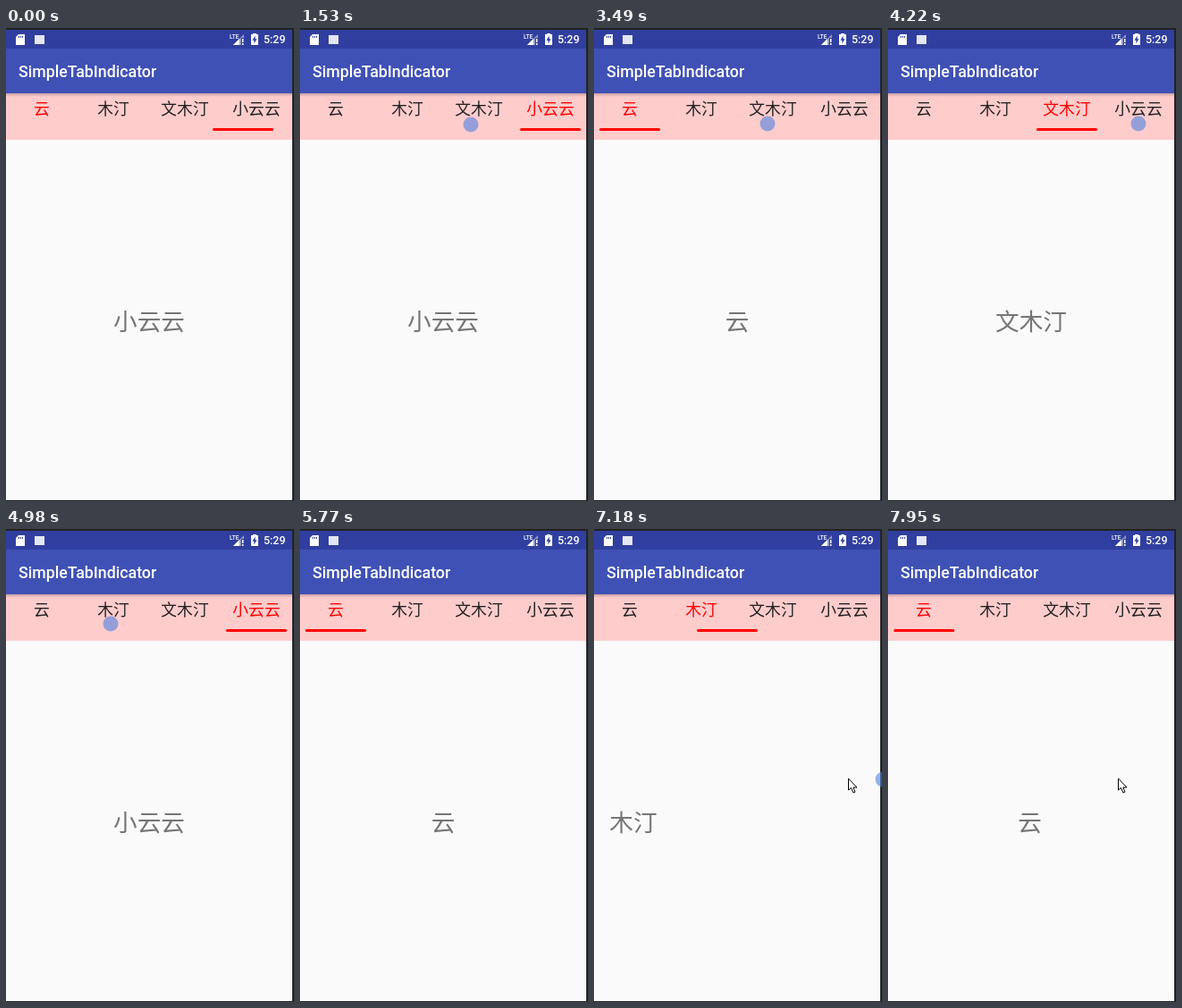
An HTML page with a canvas that plays this animation: 322x529 px, repeating every 7990 ms.

```html
<!DOCTYPE html>
<html lang="zh-CN">
<head>
<meta charset="utf-8">
<title>SimpleTabIndicator</title>
<style>
html, body { margin: 0; width: 322px; height: 529px; overflow: hidden; background: #222; }
canvas { display: block; }
</style>
</head>
<body>
<canvas id="stage" width="322" height="529"></canvas>
<script>
const ctx = document.getElementById('stage').getContext('2d');
const LOOP = 7990, SCREEN = 320, TAB = 80;
const LABELS = ['云', '木汀', '文木汀', '小云云'];
const CJK = '"Noto Sans CJK SC", "Noto Sans CJK", sans-serif';

// The screen refreshes in bursts: [first, last, refreshes]
const BURSTS = [
  [40, 160, 4], [590, 890, 7], [1530, 1890, 8], [2060, 2360, 8], [2640, 2940, 8],
  [3490, 3760, 7], [4120, 4450, 7], [4980, 4980, 1], [5090, 5770, 13], [6030, 6350, 7],
  [6410, 6500, 3], [6590, 6790, 5], [6830, 7180, 9], [7230, 7580, 8], [7630, 7950, 8]
];

const tap = (down, up, from, to, x, y = 107) => ({ down, up, from, to, x, y, drag: 0, dur: 200 });
const swipe = (down, up, from, x, drag, dur) =>
  ({ down, up, from, to: from - 1, x, y: 280, drag, dur, slide: true });

const MOVES = [
  tap(-200, -2.56, 3, 0, 40),
  tap(590, 727, 0, 3, 280),
  tap(1530, 1727, 3, 2, 191, 108),
  tap(2060, 2197, 2, 1, 118),
  tap(2640, 2777, 1, 0, 40),
  tap(3490, 3597, 0, 2, 194),
  tap(4120, 4287, 2, 3, 280),
  tap(4980, 5140, 3, 1, 117, 106),
  tap(5430, 5600, 1, 0, 40),
  tap(6030, 6187, 0, 2, 197),
  { ...tap(6410, 6478.3, 2, 3, 278), dur: 300, slide: true },
  swipe(6830, 6950, 3, 110, 160, 180),
  swipe(7070, 7180, 2, 119, 204, 380),
  swipe(7630, 7740, 1, 90, 168, 342)
];

const ARROW_PATH = [[6830, 110], [6950, 250], [7070, 118], [7180, 284], [7580, 95], [7630, 90], [7740, 257], [LOOP, 257]];

const settle = u => 1 - (1 - Math.min(1, u)) ** 5;

function snap(t) {
  const burst = BURSTS.findLast(b => b[0] <= t);
  if (!burst) return 0;
  const [first, last, count] = burst;
  if (t >= last) return last;
  const step = (last - first) / (count - 1);
  return first + Math.floor((t - first) / step) * step;
}

function stateAt(t) {
  const m = MOVES.findLast(m => m.down <= t);
  const held = Math.min(1, (t - m.down) / (m.up - m.down));
  let pos = m.from - m.drag * held / SCREEN;
  if (t >= m.up) pos += (m.to - pos) * settle((t - m.up) / m.dur);
  return {
    pos,
    selected: t < m.up ? m.from : m.to,
    page: m.slide ? pos : t < m.up + 30 ? m.from : m.to,
    touch: t <= m.up ? { x: m.x + m.drag * held, y: m.y } : null
  };
}

function rect(color, x, y, w, h) {
  ctx.fillStyle = color;
  ctx.fillRect(x, y, w, h);
}

function shape(color, ...points) {
  ctx.fillStyle = color;
  ctx.beginPath();
  points.forEach(([x, y]) => ctx.lineTo(x, y));
  ctx.closePath();
  ctx.fill();
}

function text(str, x, y, font, color, align = 'left') {
  ctx.font = font;
  ctx.fillStyle = color;
  ctx.textAlign = align;
  ctx.fillText(str, x, y);
}

function drawStatusBar() {
  rect('#303f9f', 0, 2, SCREEN, 21);
  shape('#fff', [14, 7], [21, 7], [21, 19], [11, 19], [11, 10]);
  for (const x of [14, 16, 18]) rect('#303f9f', x, 9, 1, 2);
  rect('#e4e6f3', 32, 8, 11, 10);
  text('LTE', 250, 12, '500 6.5px Roboto, sans-serif', '#fff');
  shape('#8f97cb', [254, 19], [266, 7], [266, 19]);
  shape('#fff', [254, 19], [261, 12], [261, 19]);
  rect('#303f9f', 263, 11, 3, 8);
  rect('#fff', 264, 12, 1.5, 4);
  rect('#fff', 264, 17, 1.5, 2);
  rect('#fff', 276, 6, 4, 2);
  rect('#fff', 274, 7, 8, 12);
  shape('#303f9f', [278.6, 8.5], [275.5, 13.8], [277.4, 13.8], [277.4, 17.5], [280.5, 12.2], [278.6, 12.2]);
  text('5:29', 288, 17.4, '500 12.45px Roboto, sans-serif', '#fff');
}

function drawAppBar() {
  rect('#3f51b5', 0, 23, SCREEN, 50);
  text('SimpleTabIndicator', 14, 55, '500 17.78px Roboto, sans-serif', '#fff');
}

function drawTabs({ pos, selected }) {
  rect('#ffcccc', 0, 73, SCREEN, 52);
  const shade = ctx.createLinearGradient(0, 73, 0, 77);
  shade.addColorStop(0, 'rgba(0,0,0,.22)');
  shade.addColorStop(1, 'rgba(0,0,0,0)');
  rect(shade, 0, 73, SCREEN, 4);
  LABELS.forEach((label, i) =>
    text(label, TAB * (i + .5), 96.8, '17.78px ' + CJK, i === selected ? '#f00' : '#212121', 'center'));
  ctx.fillStyle = '#f00';
  ctx.beginPath();
  ctx.roundRect(6 + TAB * pos, 112, 68, 3, 1.5);
  ctx.fill();
}

function drawPages(page) {
  LABELS.forEach((label, i) => {
    const x = SCREEN * (i - page + .5);
    if (x > -50 && x < SCREEN + 50) text(label, x, 337.7, '26.67px ' + CJK, '#757575', 'center');
  });
}

function drawTouch({ x, y }) {
  ctx.fillStyle = 'rgba(70,125,225,.58)';
  ctx.beginPath();
  ctx.arc(x, y, 8.5, 0, Math.PI * 2);
  ctx.fill();
}

function drawArrow(t) {
  const next = ARROW_PATH.findIndex(p => p[0] > t);
  if (next < 1) return;
  const [[t0, x0], [t1, x1]] = ARROW_PATH.slice(next - 1, next + 1);
  const x = Math.round(x0 + (x1 - x0) * (t - t0) / (t1 - t0));
  ctx.save();
  ctx.translate(x + .5, 279);
  shape('#fff', [0, 0], [0, 13], [3, 10.5], [5.5, 16], [7.5, 15], [5.3, 10], [9.5, 10]);
  ctx.strokeStyle = '#000';
  ctx.lineWidth = 1;
  ctx.stroke();
  ctx.restore();
}

function draw(time) {
  const t = snap(time);
  const state = stateAt(t);
  rect('#222', 0, 0, 322, 529);
  ctx.save();
  ctx.beginPath();
  ctx.rect(0, 0, SCREEN, 528);
  ctx.clip();
  rect('#fafafa', 0, 125, SCREEN, 403);
  drawStatusBar();
  drawAppBar();
  drawTabs(state);
  drawPages(state.page);
  ctx.restore();
  if (state.touch) drawTouch(state.touch);
  drawArrow(t);
}

const start = performance.now();
function tick() {
  draw((performance.now() - start) % LOOP);
  requestAnimationFrame(tick);
}
tick();
</script>
</body>
</html>
```
